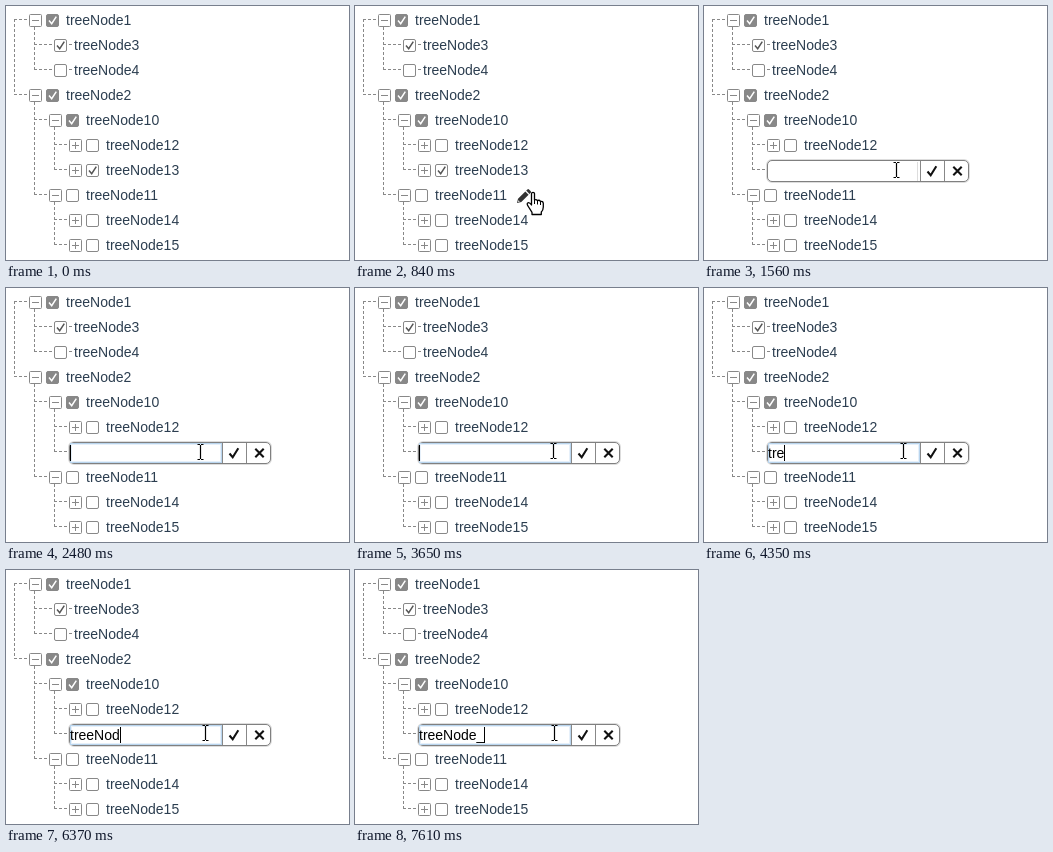
Write an HTML page that moves like this. It is 343 px wide and 254 px high and loops after 8 s.

```html
<!DOCTYPE html>
<html lang="en">
<head>
<meta charset="utf-8">
<title>Tree node editing</title>
<style>
  html, body { margin: 0; width: 100%; height: 100%; overflow: hidden; background: #fff; }
  svg { display: block; width: 343px; height: 254px; }
  text { font: 14px "Liberation Sans", Arial, sans-serif; fill: #2c3e50; white-space: pre; }
  .line { fill: none; stroke: #888; }
  .dash { fill: none; stroke: #888; stroke-dasharray: 3 2; }
  .box { fill: #fff; stroke: #888; }
  .full { fill: #888; stroke: #888; }
  .typed { fill: #000; }
  .icon { fill: none; stroke: #111; stroke-width: 2.1; }
  .pointer { fill: #fff; stroke: #000; stroke-linejoin: round; }
</style>
</head>
<body>
<svg viewBox="0 0 343 254">
  <g id="tree"></g>
  <g id="pencil">
    <path fill="#333" d="M0 14L1 9.8 8.3 2.5 11.6 5.8 4.3 13.1zM9.2 1.6L10.4.4Q11.2-.3 12 .4L13.8 2.2Q14.5 3 13.8 3.8L12.5 5z"/>
    <path fill="#fff" d="M1.4 11.2L2.8 12.6 1 13z"/>
  </g>
  <g id="editor">
    <rect x="63.5" y="154.5" width="201" height="21" rx="4.5" fill="#fff" stroke="#ddd" stroke-width="3"/>
    <rect x="63.5" y="154.5" width="201" height="21" rx="4.5" fill="#fff" stroke="#808080"/>
    <path id="idle" d="M213.5 156V175" stroke="#ddd"/>
    <g id="focus" fill="none">
      <rect x="64.5" y="155.5" width="151" height="19" stroke="#b9d5ee"/>
      <rect x="65.5" y="156.5" width="149" height="17" stroke="#e6f0fa"/>
    </g>
    <path class="line" d="M216.5 155V175M240.5 155V175"/>
    <path class="icon" d="M223.5 165.5L226.7 169.2 232.3 160.3M249.3 160.8L257.7 169.2M257.7 160.8L249.3 169.2"/>
    <text id="typed" class="typed" x="64" y="170"></text>
    <rect id="caret" y="157" width="1" height="16"/>
  </g>
  <g id="arrow"><path class="pointer" d="M.5 .5V16.5L4.2 13 6.8 18.6 9.2 17.5 6.7 12H11.8z"/></g>
  <g id="hand">
    <path class="pointer" stroke-width="1.3" d="M-1.5 13V1.8a1.5 1.5 0 0 1 3 0V8q1.8-1 3 .6 1.8-.9 3 .8 2.4-.5 2.8 1.9V15q0 3-2 5V22.5H-1V20.3L-5 14q-1.6-2.2 0-3.2 1.6-.6 3.5 2.2z"/>
    <path d="M1.5 8V12M4.5 9V12.5M7.5 9.7V13" stroke="#000"/>
  </g>
  <g id="beam"><path d="M-3 -7.5H-.5M.5 -7.5H3M-3 7.5H-.5M.5 7.5H3M0 -7V7" fill="none" stroke="#000" stroke-width="1.2"/></g>
</svg>
<script>
const LOOP = 8000;
const $ = id => document.getElementById(id);

// number, depth, kind of toggle, state of checkbox
const rows = [
  [1, 0, '-', 'full'], [3, 1, '', 'tick'], [4, 1, '', ''],
  [2, 0, '-', 'full'], [10, 1, '-', 'full'], [12, 2, '+', ''], [13, 2, '+', 'tick'],
  [11, 1, '-', ''], [14, 2, '+', ''], [15, 2, '+', '']
];

const path = (cls, d) => `<path class="${cls}" d="${d}"/>`;
const square = (cls, x, y, r) =>
  `<rect class="${cls}" x="${x + .5}" y="${y + .5}" width="12" height="12" rx="${r}"/>`;

function drawRow([number, depth, toggle, state], i) {
  const x = depth * 20, y = 8 + i * 25;
  const checkX = x + (toggle ? 40 : 28);
  let art = path('dash', `M${x + 8} ${y + 5.5}H${toggle ? x + 22 : x + 46}`);
  let node = '';
  if (toggle) {
    node += square('box', x + 23, y, 1) + path('line', `M${x + 26} ${y + 6.5}h7`);
    if (toggle === '+') node += path('line', `M${x + 29.5} ${y + 3}v7`);
  }
  node += square(state === 'full' ? 'full' : 'box', checkX, y, 1.5);
  if (state) {
    const color = state === 'full' ? '#fff' : '#555';
    node += `<path d="M${checkX + 3} ${y + 6.5}l2.7 3.2 4.6-7" fill="none" stroke="${color}" stroke-width="1.5"/>`;
  }
  node += `<text x="${checkX + 20}" y="${y + 11}">treeNode${number}</text>`;
  return art + `<g id="node${number}">${node}</g>`;
}

$('tree').innerHTML =
  path('dash', 'M8.5 13V89M28.5 21V64M28.5 96V189M48.5 121V164M48.5 196V239') +
  rows.map(drawRow).join('');

// time, cursor, x, y, row with pencil
const moves = [
  [0, ''],
  [610, 'arrow', 241, 243, 9], [690, 'arrow', 226, 224, 8], [770, 'arrow', 200, 203, 8],
  [840, 'hand', 178, 186, 7], [930, 'hand', 180, 184, 7], [1000, 'hand', 184, 177, 7],
  [1080, 'hand', 187, 169, 6], [1160, 'hand', 189, 167, 6], [1240, 'hand', 190, 165, 6],
  [1330, 'hand', 191, 164, 6],
  [1560, 'beam', 192.5, 164], [1790, 'beam', 194.5, 164],
  [3410, 'beam', 195.5, 163], [3500, 'beam', 196.5, 163], [3650, 'beam', 198.5, 163],
  [3730, 'beam', 199.5, 163]
];

// time, typed length, caret shown
const edits = [
  [0, 0, 0], [2400, 0, 1], [2950, 0, 0], [3500, 0, 1], [3820, 1, 1], [4050, 2, 1],
  [4350, 3, 1], [4510, 4, 1], [5070, 4, 0], [5360, 5, 1], [5900, 5, 0],
  [6220, 6, 1], [6370, 7, 1], [6600, 8, 1], [7150, 8, 0], [7610, 9, 1]
];

const at = (steps, t) => steps.findLast(step => step[0] <= t);
const show = (id, on) => $(id).style.display = on ? '' : 'none';
const place = (id, x, y) => $(id).setAttribute('transform', `translate(${x} ${y})`);

function render(t) {
  const [, cursor, x, y, hover] = at(moves, t);
  const [, length, caretOn] = at(edits, t);
  const editing = t >= 1560;

  for (const id of ['arrow', 'hand', 'beam']) show(id, id === cursor);
  if (cursor) place(cursor, x, y);
  show('pencil', hover);
  if (hover) place('pencil', hover === 7 ? 162 : 183, 8 + hover * 25);

  show('node13', !editing);
  show('editor', editing);
  show('idle', t < 2400);
  $('focus').style.opacity = t < 2400 ? 0 : t < 2480 ? .5 : 1;
  const typed = $('typed');
  typed.textContent = 'treeNode_'.slice(0, length);
  show('caret', caretOn);
  $('caret').setAttribute('x', Math.round(64 + (length && editing ? typed.getComputedTextLength() : 0)));
}

const start = performance.now();
function tick() {
  render((performance.now() - start) % LOOP);
  requestAnimationFrame(tick);
}
tick();
</script>
</body>
</html>
```
